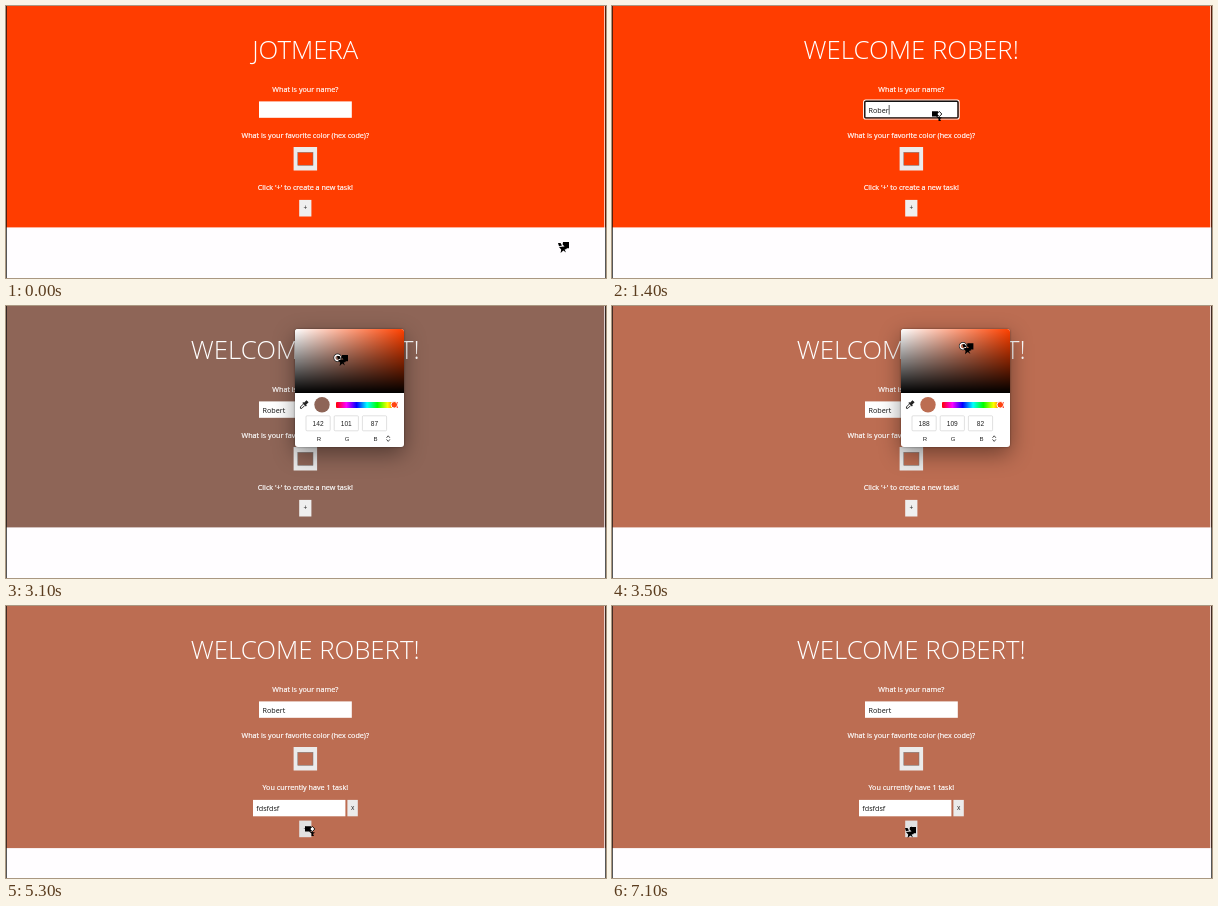
An HTML page that plays this animation: 600x272 px, repeating every 7200 ms.

```html
<!DOCTYPE html>
<html lang="en">
<head>
<meta charset="utf-8">
<title>To-do demo</title>
<style>
html, body { margin: 0; width: 100%; height: 100%; overflow: hidden; background: #fffdff; }
#stage { position: absolute; left: 0; top: 0; width: 600px; height: 272px; overflow: hidden; }
svg { position: absolute; left: 0; top: 0; overflow: visible; }
text { font: 7.2px "Open Sans", "Noto Sans", sans-serif; fill: #fff; text-anchor: middle; white-space: pre; }
.label { stroke: #fff; stroke-width: .2; }
#title { font-size: 25.8px; font-weight: 300; }
.value { fill: #111; text-anchor: start; }
.glyph { fill: #222; font-size: 6.5px; }
#picker { position: absolute; left: 288.5px; top: 22.5px; width: 109.5px; height: 118px; border-radius: 3px; box-shadow: 0 7px 22px rgba(0,0,0,.42), 0 0 2px rgba(0,0,0,.5); }
#panel { position: absolute; inset: 0; background: #fff; border-radius: 3px; overflow: hidden; }
#shade { height: 64.5px; background: linear-gradient(transparent, #000), linear-gradient(90deg, #fff, #ff4100); }
#hue { position: absolute; left: 41px; top: 73px; width: 62px; height: 6px; border-radius: 1px; background: linear-gradient(90deg, #f00, #f0f, #00f, #0ff, #0f0, #ff0, #f00); }
#panel text { font: 6.6px "Liberation Sans", Arial, sans-serif; fill: #222; }
#panel .tag { font-size: 6px; }
</style>
</head>
<body>
<div id="stage">
  <svg width="600" height="272">
    <rect id="bg" width="600"/>
    <text id="title" x="299.2" y="53.3"></text>
    <text class="label" x="299.3" y="85.9">What is your name?</text>
    <rect x="253" y="95.4" width="92.8" height="16.4" fill="#fff"/>
    <g id="nameRing" fill="none">
      <rect x="251.7" y="94.2" width="95.4" height="18.8" rx="2" stroke="#fff" stroke-width="1.2"/>
      <rect x="252.8" y="95.3" width="93.2" height="16.6" rx="1.2" stroke="#111" stroke-width="1.4"/>
      <path id="caret" d="M0 99V108.5" stroke="#111" stroke-width=".7"/>
    </g>
    <text id="name" class="value" x="256.5" y="106.6"></text>
    <text class="label" x="299.3" y="131.6">What is your favorite color (hex code)?</text>
    <rect x="287.6" y="141" width="23.5" height="23.5" fill="#ebebeb"/>
    <rect id="swatch" x="291.8" y="146.3" width="15.2" height="13" stroke="#777" stroke-width=".5"/>
    <text id="hint" class="label" x="299.3" y="184.4"></text>
    <g id="rows"></g>
    <g id="plus">
      <rect id="plusFace" x="293.2" y="0" width="12.2" height="16.6"/>
      <text class="glyph" x="299.3" y="10.6">+</text>
    </g>
    <path d="M598.5 0V272" stroke="#fffdff" opacity=".7"/>
    <path d="M.5 0V272M599.5 0V272" stroke="#111" opacity=".7"/>
  </svg>

  <div id="picker">
    <div id="panel">
      <div id="shade"></div>
      <div id="hue"></div>
      <svg width="110" height="118">
        <g transform="translate(9 75.8) rotate(45)">
          <path d="M-1.5-5h3v3.5h1v1.3h-5v-1.3h1z" fill="#222"/>
          <path d="M-1 0V4L0 5 1 4V0" fill="none" stroke="#222" stroke-width=".9"/>
        </g>
        <circle id="dot" cx="27" cy="75.8" r="7.7"/>
        <circle cx="99.3" cy="75.8" r="3.3" fill="#f41" stroke="#fff"/>
        <g id="channels"></g>
        <path d="M91.5 108.8l1.7-2 1.7 2M91.5 110.4l1.7 2 1.7-2" fill="none" stroke="#222" stroke-width=".8"/>
        <g id="ring" fill="none">
          <circle r="3.5" stroke="#222" stroke-width="1.4"/>
          <circle r="2.8" stroke="#fff" stroke-width="1.3"/>
        </g>
      </svg>
    </div>
  </div>

  <svg width="600" height="272">
    <g id="mouse">
      <path id="arrow" d="M0 1H2.5L4 3.5L1 4.3ZM5 0H11V6.2H8.2L4.6 2.6ZM1 5L6.5 4.4L9 7L6.6 7.6L8 10.6L5.3 8.6L2.6 11L3.2 7.6Z"/>
      <g id="beam">
        <path d="M0 .3H6V5.6H0ZM4 5.5L10 6.5 8 8 9 10H6.5V7.5Z"/>
        <path d="M7.3 .4L9.8 3 7.3 5.6 4.8 3Z" fill="#fff" stroke="#000" stroke-width=".9"/>
      </g>
    </g>
  </svg>
</div>
<script>
const LOOP = 7200, STEP = 100, ROW = 20.7;
const NAME = "Robert", TASK = "fdsfdsf";
const $ = id => document.getElementById(id);

// time, x, y of the pointer
const path = [
  [0, 552, 236], [300, 450, 180], [600, 322, 106], [800, 320, 105], [1900, 320, 105],
  [2300, 296, 150], [2500, 296, 150], [2900, 325, 64], [3100, 331, 49], [3500, 350.4, 37.3],
  [3600, 350.4, 37.3], [3900, 405, 150], [4200, 295, 200], [4400, 295, 200],
  [4500, 284, 202], [5000, 284, 202], [5200, 299, 220], [5600, 299, 220],
  [6200, 342, 220], [6500, 342, 220], [6700, 357, 235], [7100, 293, 221]
];
// spans in which the text pointer shows
const beams = [[600, 2100], [4500, 5500]];
const nameKeys = [900, 1000, 1200, 1300, 1400, 1500];
const taskKeys = [4600, 4600, 4700, 4800, 4800, 4900, 5000];

const within = (t, a, b) => t >= a && t < b;
const typed = (word, keys, t) => word.slice(0, keys.filter(k => k <= t).length);
const show = (id, on) => { $(id).style.display = on ? "" : "none"; };
const move = (id, x, y) => $(id).setAttribute("transform", `translate(${x} ${y})`);

function pointer(t) {
  const i = path.findIndex(p => p[0] >= t);
  if (i < 1) return path[i < 0 ? path.length - 1 : 0].slice(1);
  const [t0, x0, y0] = path[i - 1], [t1, x1, y1] = path[i];
  const k = (t - t0) / (t1 - t0);
  return [x0 + (x1 - x0) * k, y0 + (y1 - y0) * k];
}

function pickedColor(t) {
  if (t < 2900) return { s: 1, v: 1, rgb: [255, 61, 0] };
  const [x, y] = pointer(Math.min(t, 3500));
  const s = (x - 288.4) / 110, v = 1 - (y - 20.2) / 65;
  const max = 255 * v, min = max * (1 - s);
  return { s, v, rgb: [max, min + (max - min) * .2546, min].map(Math.round) };
}

$("rows").innerHTML = [0, 1].map(i => `<g id="row${i}" transform="translate(0 ${193.9 + i * ROW})">
  <rect x="247" y="0" width="92.4" height="16.4" fill="#fff"/>
  <rect id="rowRing${i}" x="246.6" y="-.3" width="93" height="17" rx="1.2" fill="none" stroke="#111" stroke-width="1.4"/>
  <text id="task${i}" class="value" x="250.3" y="10.8"></text>
  <rect x="341.4" y="0" width="10.4" height="16.4" fill="#ebebeb"/>
  <text class="glyph" x="346.6" y="10.4">x</text></g>`).join("");

$("channels").innerHTML = [..."RGB"].map((c, i) => {
  const x = 11 + i * 28.2;
  return `<rect x="${x}" y="86.8" width="24.2" height="15" rx="1" fill="#fff" stroke="#ccc" stroke-width=".6"/>
    <text id="ch${i}" x="${x + 12.1}" y="96.8"></text>
    <text class="tag" x="${x + 13}" y="112">${c}</text>`;
}).join("");

function render(t) {
  const name = typed(NAME, nameKeys, t);
  const tasks = t < 4300 ? 0 : within(t, 5400, 6400) ? 2 : 1;
  const { s, v, rgb } = pickedColor(t);
  const color = `rgb(${rgb})`;
  const [x, y] = pointer(t);

  $("bg").setAttribute("height", 221.4 + tasks * ROW);
  for (const id of ["bg", "swatch", "dot"]) $(id).setAttribute("fill", color);

  $("title").textContent = t < 800 ? "JOTMERA" : `WELCOME ${name.toUpperCase()}!`;
  $("name").textContent = name;
  show("nameRing", within(t, 700, 2300));
  move("caret", 257 + (name ? $("name").getComputedTextLength() : 0), 0);

  $("hint").textContent = tasks
    ? `You currently have ${tasks} task${tasks > 1 ? "s" : ""}!`
    : "Click '+' to create a new task!";
  show("row0", tasks > 0);
  show("row1", tasks > 1);
  show("rowRing0", within(t, 4500, 5100));
  show("rowRing1", false);
  $("task0").textContent = typed(TASK, taskKeys, t);

  const top = 193.9 + tasks * ROW;
  const hover = x > 288 && x < 304 && y > top - 3 && y < top + 14;
  move("plus", 0, top);
  $("plusFace").setAttribute("fill", hover ? "#e2e2e2" : "#efefef");

  show("picker", within(t, 2500, 3800));
  $("picker").style.opacity = t < 2600 ? .75 : 1;
  $("panel").style.opacity = t < 2600 ? 0 : 1;
  move("ring", s * 110, (1 - v) * 65);
  rgb.forEach((c, i) => { $("ch" + i).textContent = c; });

  const beam = beams.some(([a, b]) => within(t, a, b));
  show("beam", beam);
  show("arrow", !beam);
  move("mouse", x, y);
}

const start = performance.now();
function tick() {
  const t = (performance.now() - start) % LOOP;
  render(Math.floor(t / STEP) * STEP);
  requestAnimationFrame(tick);
}
tick();
</script>
</body>
</html>
```
